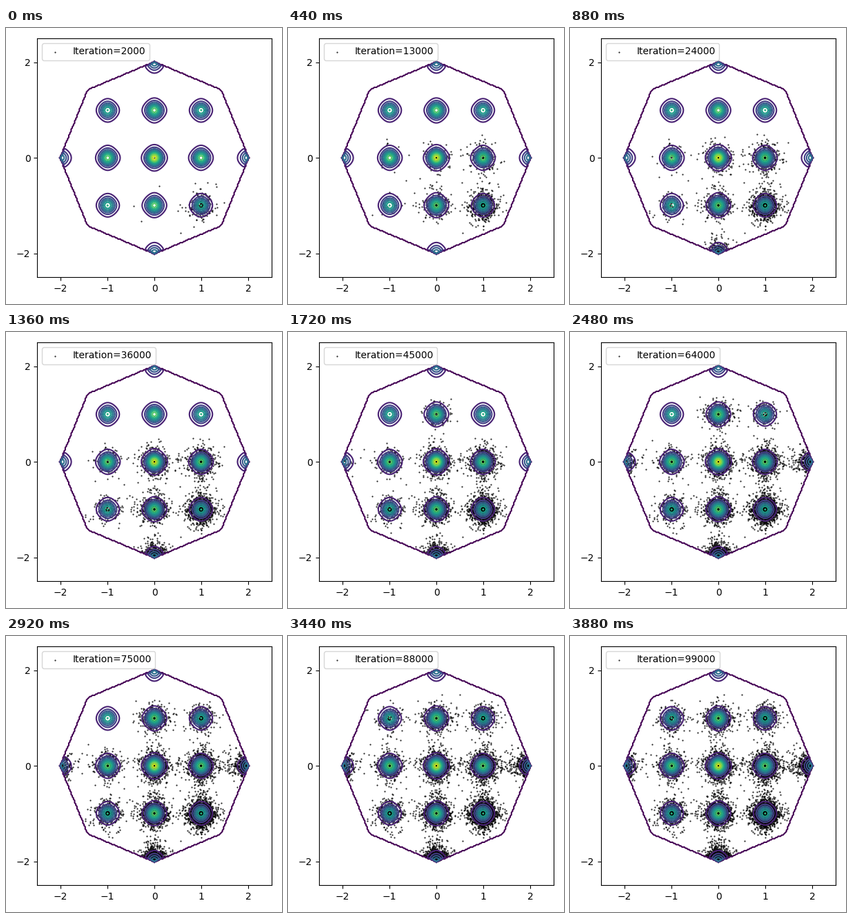
A matplotlib script for the animation above (3920 ms loop, 400 by 400 pixels).

```python
import numpy as np
import matplotlib.pyplot as plt
from matplotlib.animation import FuncAnimation

FRAMES, INTERVAL = 98, 40
BETA = 0.2             # inverse temperature
STEP = 0.0951          # spacing of the contour levels
PER_THOUSAND = 120     # plotted samples per 1000 iterations
HOME = (1, -1)         # well where the chain settles first

# First moves of the chain, on its way from the centre to HOME
OPENING = [(0, 0), (0.1, -0.59), (-0.44, -1.01), (-0.28, -1.33), (0.56, -1.57)]

# Thousands of iterations before each well is first reached
ARRIVAL = {HOME: 0, (0, -1): 3, (1, 0): 5, (0, 0): 7, (-1, 0): 9,
           (-1, -1): 10, (0, -2): 14, (0, 1): 38, (-2, 0): 42, (2, 0): 46,
           (1, 1): 56, (-1, 1): 77}


def inside(x, y):
    """Octagon with corners at distance 2."""
    angles = np.pi / 8 + np.arange(8) * np.pi / 4
    reach = np.max([x * np.cos(a) + y * np.sin(a) for a in angles], axis=0)
    return reach <= 2 * np.cos(np.pi / 8) + 1e-9


def density(x, y):
    """Boltzmann weight of the Rastrigin function, cut off at the octagon."""
    wave = np.cos(2 * np.pi * x) + np.cos(2 * np.pi * y)
    energy = 20 + x**2 + y**2 - 10 * wave
    return np.where(inside(x, y), np.exp(-BETA * energy), 0)


def sample_well(rng, well, count):
    """Rejection sampling in the unit cell around one well."""
    peak = 1.05 * density(*well)
    found = np.empty((0, 2))
    while len(found) < count:
        p = rng.uniform(-0.5, 0.5, (count * 20, 2)) + well
        keep = rng.random(len(p)) * peak < density(p[:, 0], p[:, 1])
        found = np.vstack([found, p[keep]])
    return found[:count]


def visit_odds(t):
    """Share of time per well: spreads out from HOME, favours new wells."""
    wells = np.array(list(ARRIVAL))
    age = t - np.array(list(ARRIVAL.values()))
    dist2 = ((wells - HOME)**2).sum(axis=1)
    odds = density(*wells.T) * np.exp(-dist2 / (1 + t / 12))
    odds *= 1 + 5 * np.exp(-np.maximum(age, 0) / 8)
    odds[age < 0] = 0
    return odds / odds.sum()


def build_chain(rng):
    parts = [np.array(OPENING, dtype=float)]
    for t in range(FRAMES + 1):
        counts = rng.multinomial(PER_THOUSAND, visit_odds(t))
        parts += [sample_well(rng, w, n) for w, n in zip(ARRIVAL, counts)]
    return np.vstack(parts)


chain = build_chain(np.random.default_rng(7))

fig, ax = plt.subplots(figsize=(4, 4), dpi=100)
ax.set(xlim=(-2.5, 2.5), ylim=(-2.5, 2.5),
       xticks=range(-2, 3), yticks=(-2, 0, 2))

grid = np.linspace(-2.5, 2.5, 201)
gx, gy = np.meshgrid(grid, grid)
ax.contour(gx, gy, density(gx, gy), levels=STEP * np.arange(12),
           cmap="viridis", linewidths=1.5, zorder=2)

dots = ax.scatter([], [], s=1, c="black", marker=".", zorder=1,
                  label="Iteration=2000")
label = ax.legend(loc="upper left").get_texts()[0]
fig.tight_layout()


def update(i):
    thousands = i + 2
    dots.set_offsets(chain[:len(OPENING) + thousands * PER_THOUSAND])
    label.set_text(f"Iteration={thousands * 1000}")
    return dots, label


anim = FuncAnimation(fig, update, frames=FRAMES, interval=INTERVAL,
                     repeat=True, repeat_delay=0, blit=False)
plt.show()
```
